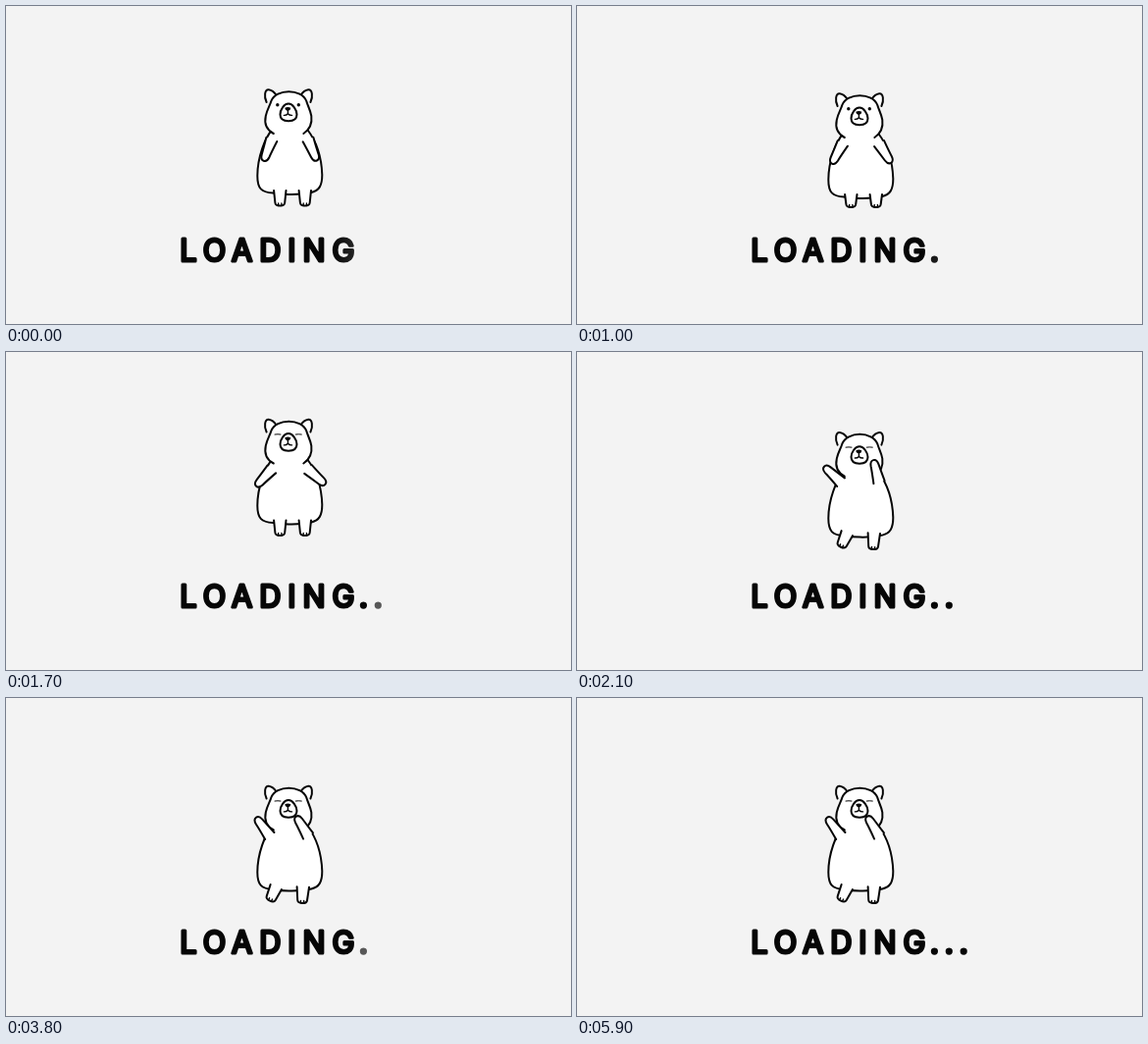
An HTML page for the animation above (6000 ms loop, 576 by 324 pixels).

```html
<!DOCTYPE html>
<html lang="en">
<head>
<meta charset="utf-8">
<title>Loading</title>
<style>
  html, body { margin: 0; width: 100%; height: 100%; overflow: hidden; background: #f3f3f3; }
  svg { display: block; width: 576px; height: 324px; }
  .line { fill: #fff; stroke: #060606; stroke-width: 2; stroke-linecap: round; stroke-linejoin: round; }
  .thin { fill: none; stroke-width: 1.4; }
  .ink { fill: #060606; }
  text { font: 400 30.6px Inter, sans-serif; letter-spacing: 7px; stroke-width: 3; stroke-linejoin: round; }
</style>
</head>
<body>
<svg viewBox="0 0 576 324">
  <defs>
    <linearGradient id="fade" gradientUnits="userSpaceOnUse" x1="332" y1="0" x2="355" y2="0">
      <stop offset="0" stop-color="#060606"/>
      <stop id="edge" offset="1" stop-color="#060606"/>
    </linearGradient>
    <path id="ear" class="line" d="M266.3 98C263.5 92 264.5 85 268.5 85.3Q273 86 276 90.5"/>
    <path id="arm" class="line" d="M-5.8 0C-5 8 -4.6 13 -4.2 18C-3.6 25 3.2 25 3.9 18C4.2 13 4.8 8 5.8 0"/>
  </defs>

  <g transform="translate(-.7 0)">
    <path id="body" class="line" d="M272 126C265 134 257 154 257 173C257 186 261 190 273 190.5Q280 192 289 192Q302 192.3 312 190C320 188 323 183 323 172C322.5 157 318 139 308 126"/>
    <g id="legL"><path class="line"/><path class="line thin"/></g>
    <g id="legR"><path class="line"/><path class="line thin"/></g>

    <g id="head">
      <use href="#ear"/>
      <use href="#ear" transform="translate(577.4 0) scale(-1 1)"/>
      <path class="line" d="M273.5 130C266 126 264 119 265.5 112C267 105 270 101 271 97C276 84 302 84 307 97C308 101 311 106 312 112C313 120 310 126 304 130"/>
      <path class="line" d="M288.7 99.6C293 99.6 297.2 106 297.2 110.5C297.2 115.5 293 117.2 288.7 117.2C284 117.2 280.2 115.5 280.2 110.5C280.2 106 284 99.6 288.7 99.6Z"/>
      <path class="ink" d="M285 103.8Q288 102 291 103.8Q291 106 288.2 107Q285 106 285 103.8Z"/>
      <path class="line thin" d="M288.1 106V109.6M284 111.4Q286.5 111.6 288.1 109.8Q289.8 111.6 292.3 111.4"/>
      <g id="open" class="ink">
        <circle cx="277.5" cy="100.7" r="1.7"/>
        <circle cx="299" cy="100.7" r="1.7"/>
      </g>
      <path id="shut" class="line" style="stroke-width:1" d="M274.7 100.5Q277.7 100 280.7 100.5M296 100.5Q299 100 302 100.5"/>
    </g>

    <use id="armL" href="#arm"/>
    <use id="armR" href="#arm"/>
  </g>

  <text x="177.3" y="259.6" fill="url(#fade)" stroke="url(#fade)">LOADING</text>
  <g id="dots" class="ink">
    <circle cx="364.4" cy="258.1" r="3.6"/>
    <circle cx="379.3" cy="258.1" r="3.6"/>
    <circle cx="394.2" cy="258.1" r="3.6"/>
  </g>
</svg>
<script>
const LOOP = 6, CYCLE = 3, FPS = 10;
const JUMP = 1.2, PEAK = 1.7, LAND = 2.2;
const $ = id => document.getElementById(id);
const ramp = (t, from, to) => Math.min(1, Math.max(0, (t - from) / (to - from)));
const ease = k => k * k * (3 - 2 * k);
const place = (id, x, y, turn = 0) =>
  $(id).setAttribute('transform', `translate(${x} ${y}) rotate(${turn})`);

// crouch, ballistic jump, then a soft landing dip
function bodyY(t) {
  if (t < JUMP) return 4 * ease(ramp(t, 0, 1));
  if (t > LAND) return 4.5 + 3.5 * Math.sin(Math.PI * ramp(t, LAND, 2.8));
  const u = ramp(t, JUMP, LAND);
  return 4 - 82 * u * (1 - u);
}

function drawLeg(id, x, y, length, turn) {
  const [leg, toes] = $(id).children;
  const n = length;
  leg.setAttribute('d', `M-6.2 0L-4.9 ${n - 3}Q-4.6 ${n} 0 ${n}Q4.6 ${n} 4.9 ${n - 3}L6.2 0`);
  toes.setAttribute('d', `M-1.6 ${n - 2.5}V${n}M1.6 ${n - 2.5}V${n}`);
  place(id, x, y, turn);
}

function draw(t) {
  const dy = bodyY(t);
  const swing = ease(ramp(t, PEAK, 2.1));
  const feet = Math.min(dy, 1.5 + 3 * swing);
  place('body', 0, dy);
  place('head', 0, dy);

  const length = 15.5 + feet - dy;
  drawLeg('legL', 280 - 4 * swing, 188 + dy, length, 24 * swing);
  drawLeg('legR', 305.5 - 2 * swing, 188 + dy, length + swing, 3 * swing);

  const lift = ramp(t, 0, PEAK) ** 2;
  const wave = ease(ramp(t, PEAK, LAND));
  place('armL', 271.5 - 2 * wave, 136 + dy, 20 + 22 * lift + 101 * wave);
  place('armR', 308.7, 136 + dy, -23 - 26 * lift - 163 * wave);

  const shut = t >= 1.3;
  $('open').style.display = shut ? 'none' : '';
  $('shut').style.display = shut ? '' : 'none';

  const c = t % CYCLE;
  [...$('dots').children].forEach((dot, i) => {
    const start = 0.3 + 0.9 * i;
    dot.style.opacity = ramp(c, start, start + 0.76);
  });
  const g = Math.round(36 - 30 * ramp(c, 0, 0.5));
  $('edge').setAttribute('stop-color', `rgb(${g},${g},${g})`);
}

function tick() {
  draw(Math.floor(performance.now() / 1000 % LOOP * FPS) / FPS);
  requestAnimationFrame(tick);
}
tick();
</script>
</body>
</html>
```
